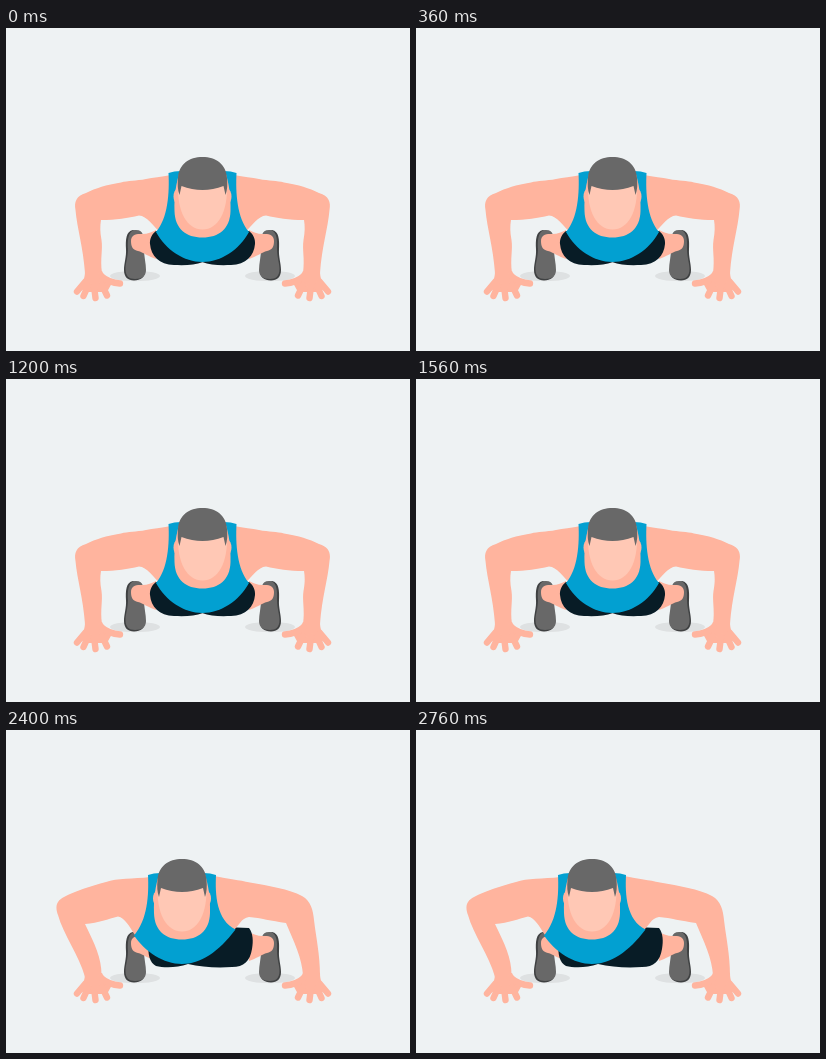
Animation, 404 px wide and 323 px high, one loop 3000 ms. Source, as an HTML page:

```html
<!DOCTYPE html>
<html lang="en">
<head>
<meta charset="utf-8">
<title>Push-ups</title>
<style>
  html, body { margin: 0; width: 100%; height: 100%; overflow: hidden; background: #eef2f3; }
  svg { display: block; width: 100vw; height: 100vh; }
  .skin { fill: #ffb49e; }
  .fingers { fill: none; stroke: #ffb49e; stroke-width: 6.4; stroke-linecap: round; }
  .face { fill: #ffc8b5; }
  .hair, .shoe { fill: #686868; }
  .sole { fill: #3f4142; }
  .shirt { fill: #02a0d1; }
  .shorts { fill: #081c26; }
  .shadow { fill: #dee1e2; }
</style>
</head>
<body>
<svg id="stage" viewBox="0 0 404 323"></svg>
<script>
const path = (cls, d) => `<path class="${cls}" d="${d}"/>`;
const move = (x, y, s) => `<g transform="translate(${x} ${y})">${s}</g>`;
const mirror = s => `<g transform="matrix(-1 0 0 1 393 0)">${s}</g>`;
const both = s => s + mirror(s);

const feet = both(
  '<ellipse class="shadow" cx="129" cy="248" rx="25" ry="5.2"/>' +
  path('sole', 'M127 202C120 203 119.5 212 120 221C120.5 229 118 235 118 242C118 249 122 252.5 128 252.5C135 252.5 139 249 139 243L136 206Z') +
  path('shoe', 'M130 202C122 202 121.5 212 122 221C122 229 119.5 235 119.5 241C119.5 248 123 251 129 251C136 251 140 248 140 242C140 235 138 229 138 221C138 209 138 202 130 202Z'));

const hands = both(
  path('skin', 'M79 243L96 243C98 248 103 252 106 255L101 264L78 264L74 258C77 254 79 250 79 243Z') +
  path('fingers', 'M95 248Q103 255 114 255.5M96 257L101 267.5M88 258L89.5 270M82 258L77.5 268M79 254L71 263.5'));

const head =
  '<ellipse class="skin" cx="171.5" cy="168.5" rx="4" ry="7.5"/><ellipse class="skin" cx="221.5" cy="168.5" rx="4" ry="7.5"/>' +
  path('face', 'M172 156C171 184 181 201.5 196.5 201.5C212 201.5 222 184 221 156Z') +
  path('hair', 'M173.5 167C171.5 162 171.5 156 172 150C173 136 183 129 196.5 129C210 129 220 136 221 150C221.5 156 221.5 162 219.5 167L217.5 158Q207 162 196.5 162Q186 162 175.5 158Z');

// Left and right are the lower corners of the shirt.
const shirt = (left, right) =>
  path('shirt', `M162.5 145Q168 143 175 143H218Q225 143 230.5 145C229.5 165 231 190 ${right}C233 222 215 234 196.5 234C178 234 160 222 ${left}C162 190 163.5 165 162.5 145Z`) +
  path('skin', 'M174 143C170 155 168 168 168.5 183C169 201 180 209.5 196.5 209.5C213 209.5 224 201 224.5 183C225 168 223 155 219 143Z');

const lowLegs = both(path('skin', 'M125 213C125 207 130 205.5 136 206C142 206 146 204 150 202V231C143 229 137 224 132 223C127 222 125 219 125 213Z'));

const down = lowLegs +
  both(
    path('shorts', 'M150 203C146 206 143.5 211 144 216C145 228 153 236.5 168 237C180 237.5 189 237 197 234V205Z') +
    path('skin', 'M165 147C155 149 147 149.5 140 151C130 153 122 152.5 115 154.5C100 157 90 160 80 165C70 168 68 174 69.5 182C71 200 77 218 79 245H96C94 230 97 222 95.5 212C94 204 94 198 95 192C110 192 122 190 133 187.5C141 188 147 198 153 203L165 199Z')) +
  shirt('150 204', '243 204') + head;

const up =
  both(
    path('skin', 'M136 184C133 193 127 201 125.5 210C126 220 134 225 140 220C145 210 153 203 166 195Z') +
    path('shorts', 'M150 146C142 159 137 172 136.5 184C138 195 148 197 160 196.5C175 195 187 187 197 179V146Z') +
    path('skin', 'M165 85C157 88 151 93 145 94.5C130 97 118 102 110 113C104 122 103 129 100 138C93 150 91 162 90 172C88 187 84 200 82 215C80 228 79 238 79 245H96C96 232 103 220 105 205C108 193 111 186 111 178C120 170 128 160 131.5 152C134 147 135 140 139 139C144 138 146 145 150 149L165 142Z')) +
  move(0, -57.5, shirt('149 205.5', '244 205.5')) + move(0, -69, head);

const lean = lowLegs +
  path('shorts', 'M150 198C146 203 145.5 211 147 219C149 231 155 237 167 237C183 238 198 237 211 234C222 238 235 238 243 236C249 233 252 224 250 212L200 196Z') +
  path('skin', 'M185 146C170 149 160 150 149 152.5C130 156 110 159 97 166C88 171 86 180 85 190C83 207 79 225 79 245H96C97 228 105 212 113 193C128 191 138 188 150 187C158 188 160 196 167 202L185 198Z') +
  path('skin', 'M249 147C266 149 282 148 293 152C308 156 324 161 335 167C343 171 344 177 341 185C336 204 320 225 314 247H297.5C297 228 304 215 314 194C300 193 291 189 281 186.5C274 188 270 196 264 205L246 199Z') +
  move(20.5, 0, shirt('143 199.5', '244.5 205.5') + head);

const poses = [down, up, down, lean, mirror(lean)];
const stage = document.getElementById('stage');
stage.innerHTML = feet + poses.map(p => `<g class="pose">${p}</g>`).join('') + hands;
const layers = stage.querySelectorAll('.pose');

function draw() {
  const step = Math.floor(performance.now() % 3000 / 600);
  layers.forEach((g, i) => g.style.display = i === step ? '' : 'none');
  requestAnimationFrame(draw);
}
draw();
</script>
</body>
</html>
```
